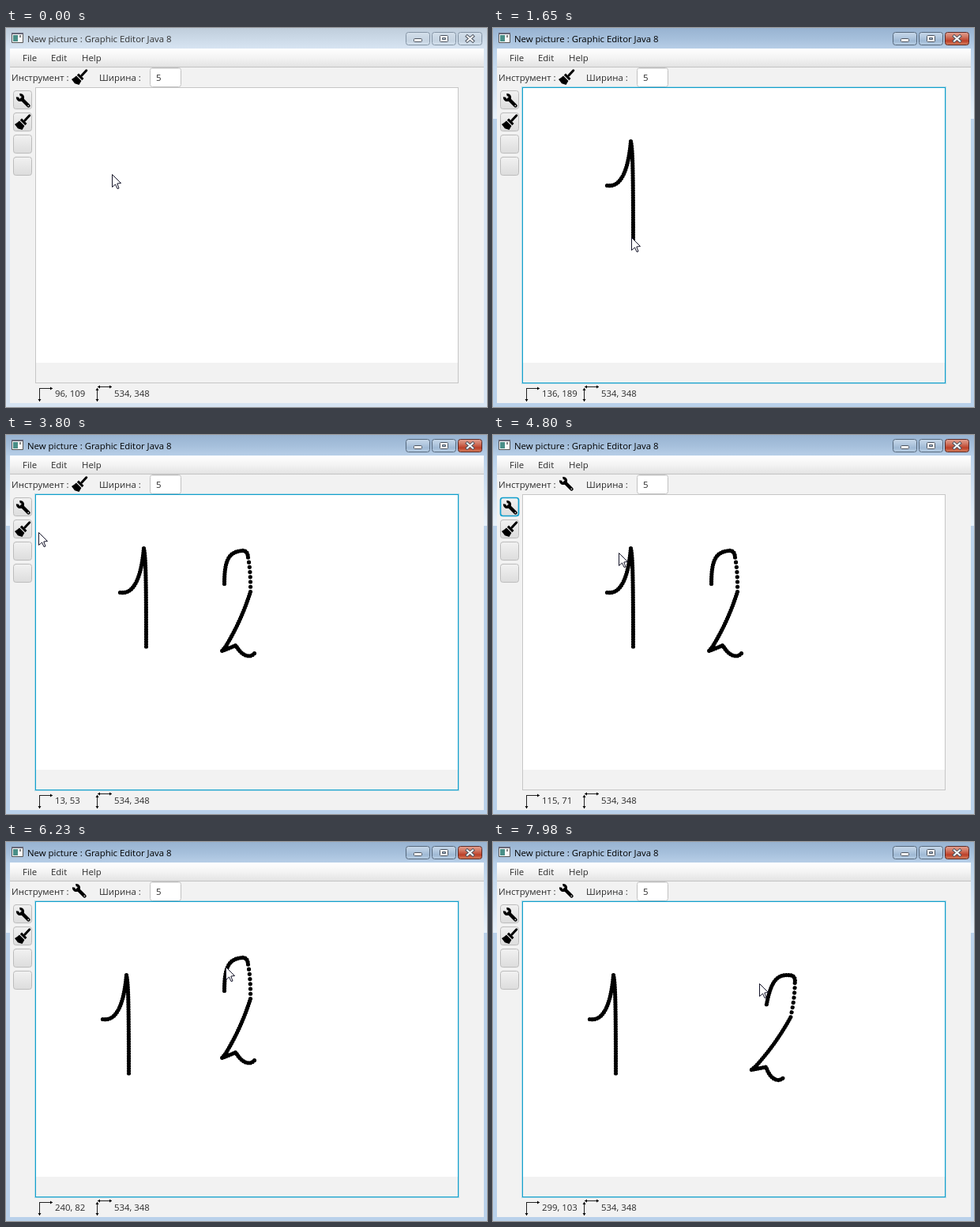
Write an HTML page with a canvas that moves like this. It is 609 px wide and 480 px high and loops after 8000 ms.

```html
<!DOCTYPE html>
<html lang="en">
<head>
<meta charset="utf-8">
<title>Graphic Editor</title>
<style>
html, body { margin: 0; width: 100%; height: 100%; overflow: hidden; background: #f2f2f2; }
canvas { display: block; width: 609px; height: 480px; }
</style>
</head>
<body>
<canvas id="stage" width="609" height="480"></canvas>
<script>
const g = document.getElementById('stage').getContext('2d');
const LOOP = 8000, LAG = 35;
const ACTIVE = 400, PICK = 4230, GRAB = 5460, DROP = 5820, GRAB2 = 6930, DROP2 = 7235, TURN = 7860;
const BLUE = '#12a0cd', FINE = 3.1, COARSE = 6.5;
const clamp = (v, a, b) => Math.min(b, Math.max(a, v));

// The pointer's journey: each leg continues the curve where the last one stopped
const legs = [];
let pen = '134 185';

function leg(from, to, curve, step = 0) {
  const path = document.createElementNS('http://www.w3.org/2000/svg', 'path');
  path.setAttribute('d', `M${pen} ${curve}`);
  pen = curve.match(/[\d.]+ [\d.]+$/)[0];
  const len = path.getTotalLength();
  const point = k => path.getPointAtLength(k * len);
  const dots = [];
  if (step) {
    const n = Math.round(len / step);
    for (let i = 0; i <= n; i++) dots.push({ time: from + (to - from) * i / n, at: point(i / n) });
  }
  legs.push({ from, to, step, point });
  return dots;
}

leg(50, 320, 'L141.5 196.5');
const one = [
  ...leg(ACTIVE, 960, 'C158 199 168 180 171.5 140.5', FINE),
  ...leg(960, 1600, 'C173.5 150 174.5 165 174.5 265', FINE)
];
leg(1700, 2050, 'L273.5 185.5');
const two = [
  ...leg(2120, 2480, 'C273.5 155 279 145 296 143.5 Q303 143 303.5 152', FINE),
  ...leg(2490, 2555, 'Q307 170 306.5 195.5', COARSE),
  ...leg(2560, 3270, 'Q295 232 275 265 L270.5 270.5 L288 263.5 Q297 279 308 276.5 L311.5 273.5', FINE)
];
leg(3330, 4050, 'C200 210 90 150 42 125 L18 88');
leg(4300, 5020, 'Q90 145 174.5 150');
leg(5100, 5220, 'L174.5 160');
leg(GRAB, DROP, 'L152.5 185');
leg(5880, 6195, 'L278 158');
leg(6270, 6330, 'L283 158');
leg(6700, 6760, 'L281 158');
leg(GRAB2, DROP2, 'L346 178');
leg(TURN, 7945, 'L337 179');

function pointer(t) {
  const l = legs.findLast(l => l.from <= t) || legs[0];
  const k = clamp((t - l.from) / (l.to - l.from), 0, 1);
  return l.point(l.step ? k : k * (2 - k));
}
function drag(t, from, to) {
  const a = pointer(from), b = pointer(clamp(t, from, to));
  return [b.x - a.x, b.y - a.y];
}

function fade(y, h, ...stops) {
  const f = g.createLinearGradient(0, y, 0, y + h);
  stops.forEach((c, i) => f.addColorStop(i / (stops.length - 1), c));
  return f;
}
function rect(x, y, w, h, fill) {
  g.fillStyle = fill;
  g.fillRect(x, y, w, h);
}
function box(x, y, w, h, r, fill, line, width = 1) {
  g.beginPath();
  g.roundRect(x + .5, y + .5, w - 1, h - 1, r);
  g.fillStyle = fill;
  g.fill();
  g.strokeStyle = line;
  g.lineWidth = width;
  g.stroke();
}
function poly(pts, fill, line) {
  g.beginPath();
  pts.forEach(p => g.lineTo(...p));
  g.closePath();
  g.fillStyle = fill;
  g.fill();
  if (line) { g.strokeStyle = line; g.lineWidth = 1; g.stroke(); }
}
function seg(x1, y1, x2, y2, w, color, cap = 'butt') {
  g.beginPath();
  g.moveTo(x1, y1);
  g.lineTo(x2, y2);
  g.lineWidth = w;
  g.lineCap = cap;
  g.strokeStyle = color;
  g.stroke();
}
function text(s, x, y, color = '#2b2b2b') {
  g.font = '11.4px "Open Sans", "Noto Sans", sans-serif';
  g.fillStyle = color;
  g.fillText(s, x, y);
}
function at(x, y, draw) {
  g.save();
  g.translate(x, y);
  draw();
  g.restore();
}

function wrench() {
  seg(8, 8, 16.5, 16.5, 4.4, '#000', 'round');
  g.beginPath();
  g.arc(6, 6, 3.4, -1.75, 3.3);
  g.lineWidth = 3.4;
  g.lineCap = 'butt';
  g.stroke();
  g.beginPath();
  g.arc(16.3, 16.3, .9, 0, 7);
  g.fillStyle = '#ddd';
  g.fill();
}
function brush() {
  seg(18.8, 1.8, 13, 8, 3, '#000', 'round');
  poly([[9, 5.5], [15.5, 12], [13.3, 14.2], [6.8, 7.7]], '#000');
  poly([[6, 8.6], [12.4, 15], [9.5, 20], [4, 18.3], [0, 13], [3, 11]], '#000');
}

// Measuring line with an arrow head at its end, and at its start if both
function ruler(x1, y1, x2, y2, both) {
  const len = Math.hypot(x2 - x1, y2 - y1), dx = (x2 - x1) / len, dy = (y2 - y1) / len;
  const head = (x, y, s) => poly([[x, y], [x - s * dx * 3 + dy * 2, y - s * dy * 3 + dx * 2],
    [x - s * dx * 3 - dy * 2, y - s * dy * 3 - dx * 2]], '#000');
  seg(x1, y1, x2, y2, 1, '#222');
  head(x2, y2, 1);
  if (both) head(x1, y1, -1);
}

function frame(active) {
  rect(0, 0, 609, 480, active ? '#b9d1ea' : '#d7e4f2');
  rect(0, 0, 609, 26, active ? fade(0, 26, '#98b3d1', '#a5bfdb', '#b7cee7') : fade(0, 26, '#bfcddb', '#cbd9e7', '#d7e4f2'));
  if (active) rect(0, 26, 609, 89, fade(26, 89, '#b9d1ea', '#e9f2fb'));

  box(7, 6, 15, 13, 0, '#f8f8f8', '#555');
  rect(7, 6, 15, 2, '#667');
  rect(9, 9, 6, 8, '#4a8f88');
  rect(17, 9, 2, 3, '#888');
  text('New picture : Graphic Editor Java 8', 27, 18, active ? '#000' : '#333');

  const face = active ? fade(5, 17, '#c9d9ea', '#b6cbe1', '#9fb9d4', '#bcd2e8')
                      : fade(5, 17, '#d6e1ec', '#cbd8e5', '#c5d3e1', '#d8e5f1');
  const red = fade(5, 17, '#e5a596', '#d27a66', '#bd3f28', '#d98b68');
  const line = active ? '#56687c' : '#8494a5', ink = '#4c5460';
  for (const x of [506, 539, 572])
    box(x, 5, 31, 17, 3, active && x === 572 ? red : face, active && x === 572 ? '#5b2a26' : line);
  box(516, 13, 11, 5, 1, '#fff', ink);
  box(549, 9, 11, 9, 1, '#fff', ink);
  box(552, 12, 5, 3, 0, face, ink);
  for (const [w, c] of [[4, ink], [2, '#fff']]) {
    seg(584, 10.5, 591, 16.5, w, c, 'square');
    seg(591, 10.5, 584, 16.5, w, c, 'square');
  }
}

function button(y, focus, hover) {
  const face = hover ? fade(y, 24, '#fcfcfc', '#e6e6e6') : fade(y, 24, '#f2f2f2', '#dcdcdc');
  box(9, y, 24, 24, 3, face, focus ? BLUE : '#bcbcbc', focus ? 1.7 : 1);
}

function client(t, spot) {
  const picked = t >= PICK, tool = picked && t < GRAB;
  rect(5, 26, 600, 449, '#f2f2f2');
  rect(5, 26, 600, 24, fade(26, 24, '#fff', '#f3f3f3', '#e2e2e2'));
  rect(5, 49, 600, 1, '#c3c3c3');
  text('File', 21, 42);
  text('Edit', 57, 42);
  text('Help', 96, 42);

  text('Инструмент :', 7, 67);
  at(83, 52, picked ? wrench : brush);
  text('Ширина :', 118, 67);
  box(182, 50, 40, 25, 3, '#fff', '#c2c2c2');
  rect(184, 51, 36, 1, '#e4e4e4');
  text('5', 190, 67);

  for (let y = 79; y < 190; y += 28) {
    const hover = spot.x > 9 && spot.x < 33 && spot.y > y && spot.y < y + 24;
    button(y, tool && y === 79, hover);
  }
  at(12, 82, wrench);
  at(11, 109, brush);

  const focus = t >= ACTIVE && !tool;
  rect(37, 75, 536, 375, focus ? BLUE : '#c6c6c6');
  rect(38, 76, 534, 348, '#fff');
  rect(38, 424, 534, 25, '#f2f2f2');
  if (focus) {
    g.strokeStyle = 'rgba(27,161,201,.3)';
    g.lineWidth = 1;
    g.strokeRect(36.5, 74.5, 537, 376);
  }
}

function paint(dots, t) {
  g.fillStyle = '#000';
  g.beginPath();
  for (const { time, at: p } of dots) {
    if (time > t) break;
    g.moveTo(p.x + 5.6, p.y + 3);
    g.arc(p.x + 3, p.y + 3, 2.6, 0, 7);
  }
  g.fill();
}

function arrow({ x, y }) {
  at(Math.round(x) + .5, Math.round(y) + .5, () =>
    poly([[0, 0], [0, 16], [4, 12.5], [6.5, 18], [8.5, 17.5], [6.3, 11.5], [11, 11]], '#fff', '#15152a'));
}

function draw(t) {
  const app = Math.max(0, t - LAG);
  const spot = pointer(t), seen = pointer(app);
  frame(t >= ACTIVE);
  client(t, spot);

  at(...drag(app, GRAB, DROP), () => paint(one, app));
  const [dx, dy] = drag(app, GRAB2, DROP2);
  const turn = -drag(app, TURN, LOOP)[0] / 9 * 11 * Math.PI / 180;
  at(293.5 + dx, 212.5 + dy, () => {
    g.rotate(turn);
    g.translate(-293.5, -212.5);
    paint(two, app);
  });

  ruler(42.5, 456.5, 59, 456.5);
  ruler(42.5, 456, 42.5, 473);
  ruler(115.5, 456, 115.5, 473, true);
  ruler(116, 454.5, 134, 454.5, true);
  const inside = v => Math.max(0, Math.floor(v + .01));
  text(inside(seen.x - 38) + ', ' + inside(seen.y - 76), 62, 467);
  text('534, 348', 137, 467);
  arrow(spot);
}

const start = performance.now();
function tick() {
  draw((performance.now() - start) % LOOP);
  requestAnimationFrame(tick);
}
tick();
</script>
</body>
</html>
```
